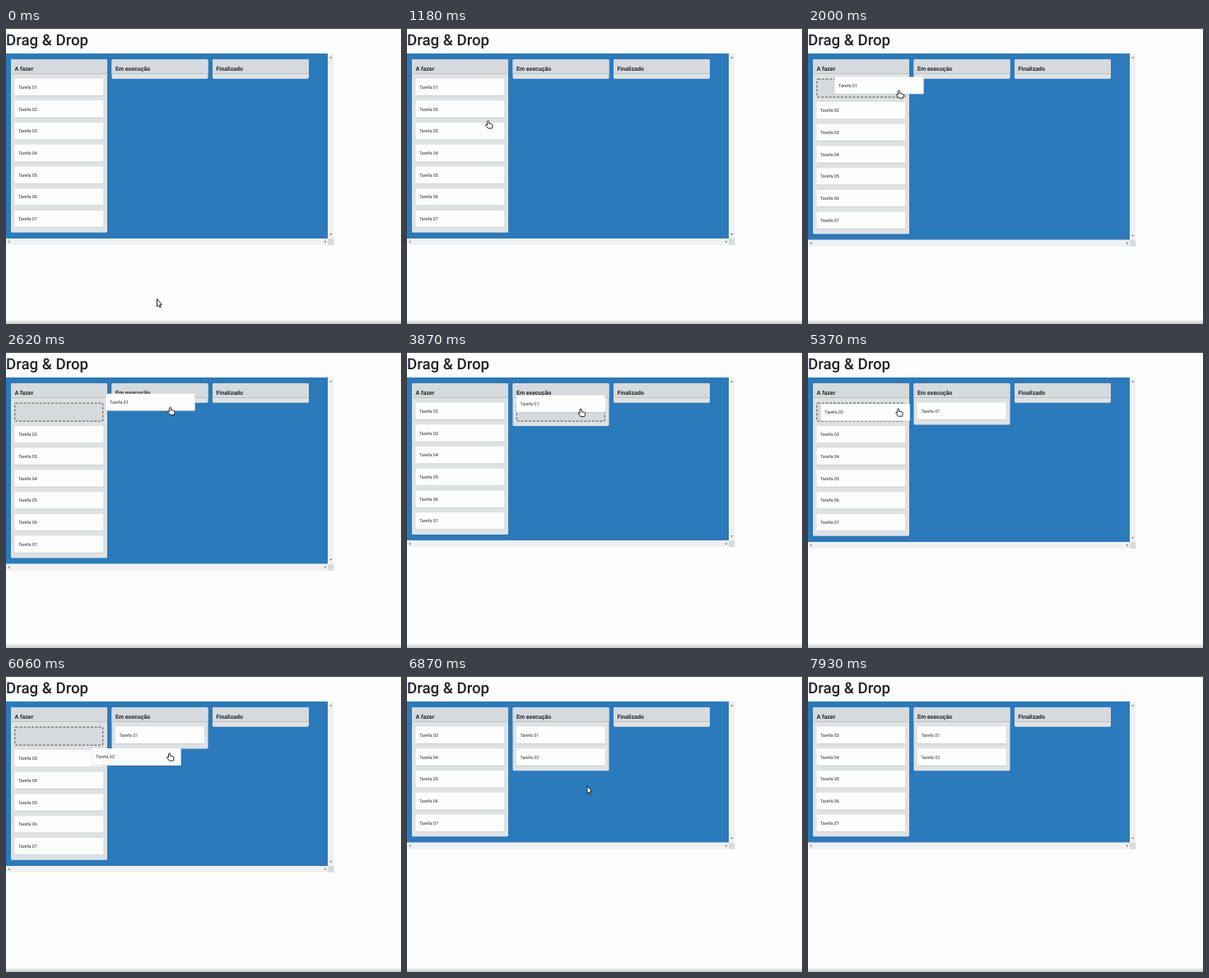
Recreate the animation shown at these times as an HTML page. Size 480 by 360 pixels, loop 8000 ms.

```html
<!DOCTYPE html>
<html lang="pt">
<head>
<meta charset="utf-8">
<title>Drag &amp; Drop</title>
<style>
html, body { margin: 0; width: 100%; height: 100%; overflow: hidden; background: #fdfdfd; }
svg { display: block; width: 100vw; height: 100vh; }
text { font-family: Roboto, "Noto Sans", sans-serif; fill: #2a2d30; text-rendering: geometricPrecision; }
.title { font-size: 18.7px; font-weight: 500; fill: #212529; }
.head { font-size: 7.1px; font-weight: 700; fill: #24282b; }
.task { font-size: 5.45px; }
.cursor { fill: #fff; stroke: #111; stroke-width: .9; stroke-linejoin: round; }
</style>
</head>
<body>
<svg id="stage" viewBox="0 0 480 360">
  <defs>
    <linearGradient id="shade" x1="0" y1="0" x2="0" y2="1">
      <stop offset="0" stop-color="#fdfdfd"/>
      <stop offset="1" stop-color="#c9c9c9"/>
    </linearGradient>
  </defs>
  <rect width="480" height="360" fill="#fdfdfd"/>
  <rect width="480" height="1" fill="#3a3a3a"/>
  <rect y="354" width="480" height="6" fill="url(#shade)"/>
  <text class="title" x="0" y="20.8">Drag &amp; Drop</text>
</svg>
<script>
const LOOP = 8000;
const TOP = 31, COL_TOP = 38, COL_W = 117, COL_STEP = 122.5, LIST_TOP = 61.6;
const CARD_W = 108, CARD_H = 20.4, CARD_STEP = 26.72, HOLE_STEP = 28.4;
const BOARD_W = 391, BAR_W = 7.4;
const HOLE = 0;

const stage = document.getElementById('stage');

function add(parent, tag, attrs, text) {
  const el = document.createElementNS('http://www.w3.org/2000/svg', tag);
  set(el, attrs);
  if (text) el.textContent = text;
  parent.append(el);
  return el;
}
function set(el, attrs) {
  for (const key in attrs) el.setAttribute(key, attrs[key]);
}
function place(el, x, y) {
  el.setAttribute('transform', `translate(${x.toFixed(2)} ${y.toFixed(2)})`);
}
function show(el, on) {
  el.style.display = on ? '' : 'none';
}

// Board and scrollbars
const board = add(stage, 'rect', { y: TOP, width: BOARD_W, fill: '#2b7abc' });
const sideBar = add(stage, 'rect', { x: BOARD_W, y: TOP, width: BAR_W, fill: '#f0f1f2' });
const bottomBar = add(stage, 'g', {});
add(bottomBar, 'rect', { width: BOARD_W, height: 8, fill: '#f0f1f2' });
add(bottomBar, 'rect', { x: BOARD_W, width: BAR_W, height: 8, fill: '#d9dbdc' });
const arrowFill = '#777b7e';
add(bottomBar, 'path', { d: 'M2.4 4l2-1.7v3.4z', fill: arrowFill });
add(bottomBar, 'path', { d: 'M389.2 4l-2-1.7v3.4z', fill: arrowFill });
add(bottomBar, 'path', { d: 'M394.8-4l-1.7-2h3.4z', fill: arrowFill });
add(stage, 'path', { d: 'M394.8 34.8l-1.7 2h3.4z', fill: arrowFill });

const colX = i => 6 + i * COL_STEP;
const columns = ['A fazer', 'Em execução', 'Finalizado'].map((name, i) => {
  const x = colX(i);
  const body = add(stage, 'rect', { x, y: COL_TOP, width: COL_W, rx: 1.6, fill: '#dfe2e3' });
  add(stage, 'path', { d: `M${x} 55.3v-15.7q0-1.6 1.6-1.6h${COL_W - 3.2}q1.6 0 1.6 1.6v15.7z`, fill: '#d6dadc' });
  add(stage, 'rect', { x, y: 55, width: COL_W, height: .9, fill: '#b9bfc2' });
  add(stage, 'text', { class: 'head', x: x + 4.4, y: 51.6 }, name);
  return body;
});

const hole = add(stage, 'rect', {
  width: CARD_W - 1, height: 22, rx: 1, fill: '#d6dadc',
  stroke: '#4c5154', 'stroke-width': 1, 'stroke-dasharray': '3 1.8'
});

// Later cards lie below earlier ones, so a lifted card covers its neighbours
const cards = [];
for (let n = 7; n >= 1; n--) {
  const card = cards[n] = add(stage, 'g', {});
  add(card, 'rect', { y: .7, width: CARD_W, height: CARD_H, rx: 1.2, fill: '#c3c8ca' });
  add(card, 'rect', { width: CARD_W, height: CARD_H, rx: 1.2, fill: '#fdfdfd' });
  add(card, 'text', { class: 'task', x: 4.6, y: 12.3 }, 'Tarefa 0' + n);
}

const arrow = add(stage, 'path', { class: 'cursor', d: 'M0 0V9.2L2 7.4 3.4 10.5 4.8 9.8 3.5 6.8H5.8Z' });
const hand = add(stage, 'path', {
  class: 'cursor',
  d: 'M-1 .8Q0-.5 1 .8V3.6L4.4 4.3Q5.8 4.7 5.6 6.2L4.8 9.6H0L-2.9 5.9Q-3.1 4.4-1.7 4.9L-1 5.5Z'
});

// Pointer stops: time, x, y
const stops = [
  [0, 183.5, 329.5], [810, 183.5, 329.5], [1180, 98.5, 112.5],
  [1500, 88, 78], [1750, 88, 78], [2620, 199.5, 67],
  [3100, 211, 69], [4120, 211, 69], [4750, 96.5, 81],
  [5000, 104, 67], [5250, 104, 67], [6060, 198.5, 93.5],
  [6400, 225, 95], [6700, 225, 95], [7350, 190, 321], [LOOP, 190, 321]
];
const drags = [
  { card: 1, lift: 1750, cross: 2800, drop: 4000, dx: 78, dy: 16.3 },
  { card: 2, lift: 5250, cross: 6250, drop: 6660, dx: 94, dy: 5.5 }
];
const handTimes = [[1060, 4330], [4900, 6820]];
const HIDE = 7680;

function pointer(t) {
  const i = stops.findIndex(s => s[0] > t);
  const [t0, x0, y0] = stops[i - 1], [t1, x1, y1] = stops[i];
  const u = (t - t0) / (t1 - t0), k = u * u * (3 - 2 * u);
  return [x0 + (x1 - x0) * k, y0 + (y1 - y0) * k];
}

function lists(t) {
  const todo = [1, 2, 3, 4, 5, 6, 7], doing = [];
  for (const d of drags) {
    if (t < d.lift) break;
    if (t < d.cross) {
      todo[todo.indexOf(d.card)] = HOLE;
    } else {
      todo.splice(todo.indexOf(d.card), 1);
      doing.push(t < d.drop ? HOLE : d.card);
    }
  }
  return [todo, doing, []];
}

function draw(t) {
  const [px, py] = pointer(t);
  const drag = drags.find(d => t >= d.lift && t < d.drop);
  let bottom = 0;

  show(hole, !!drag);
  lists(t).forEach((list, i) => {
    const x = colX(i) + 4.3;
    let y = LIST_TOP;
    for (const item of list) {
      if (item === HOLE) {
        set(hole, { x: x + .5, y: y + .5 });
        y += HOLE_STEP;
      } else {
        place(cards[item], x, y);
        y += CARD_STEP;
      }
    }
    y += .1;
    set(columns[i], { height: y - COL_TOP });
    bottom = Math.max(bottom, y + 7.3);
  });
  if (drag) place(cards[drag.card], px - drag.dx, py - drag.dy);

  set(board, { height: bottom - TOP });
  set(sideBar, { height: bottom - TOP });
  place(bottomBar, 0, bottom);

  const isHand = handTimes.some(([a, b]) => t >= a && t < b);
  show(hand, isHand);
  show(arrow, !isHand && t < HIDE);
  place(isHand ? hand : arrow, px, py);
}

const start = performance.now();
function tick() {
  draw((performance.now() - start) % LOOP);
  requestAnimationFrame(tick);
}
tick();
</script>
</body>
</html>
```
